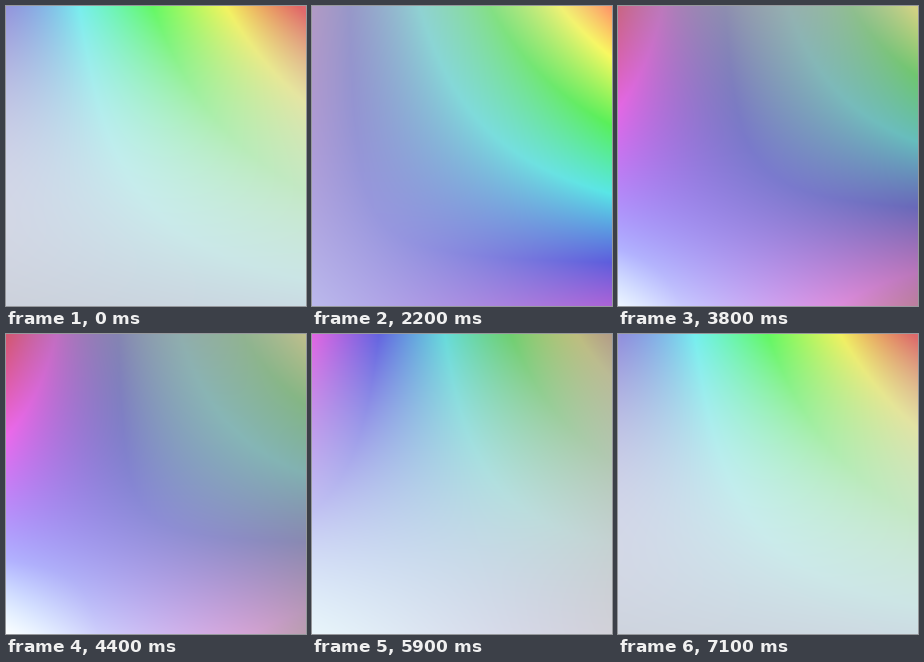
An HTML page with a canvas for the animation above (7200 ms loop, 300 px wide and 300 px high).

```html
<!DOCTYPE html>
<html lang="en">
<head>
<meta charset="utf-8">
<style>
html, body { margin: 0; height: 100%; overflow: hidden; }
canvas { display: block; width: 100vw; height: 100vh; }
</style>
</head>
<body>
<canvas id="stage" width="300" height="300"></canvas>
<script>
const SIZE = 300, LOOP = 7200, STEP = 100;
const ctx = document.getElementById('stage').getContext('2d');
const image = ctx.createImageData(SIZE, SIZE);

// Each corner's hue, saturation and lightness swing once per loop: [mean, cosine, sine].
const corners = {
  topLeft:     { hue: [289, -49, -36], sat: [47, 3, -21],    light: [66, 6, 5] },
  topRight:    { hue: [23, -29, -19],  sat: [60, 5, 44],     light: [66, -2, 4] },
  bottomLeft:  { hue: [220, 0, 24],    sat: [63, -46, -23],  light: [89, -6, -9] },
  bottomRight: { hue: [264, -66, -9],  sat: [33, -2, 27],    light: [72, 12, -7] }
};
const TOP_GLOW = 34, MIDDLE_GLOW = 8;

const mix = (a, b, f) => a + (b - a) * f;
const clamp = (v, lo, hi) => Math.min(hi, Math.max(lo, v));

function draw(time) {
  const angle = 2 * Math.PI * time / LOOP;
  const cos = Math.cos(angle), sin = Math.sin(angle);
  const wave = ([mean, c, s]) => mean + c * cos + s * sin;
  const edges = name => {
    const [tl, tr, bl, br] = Object.values(corners).map(corner => wave(corner[name]));
    return v => [mix(tl, bl, v), mix(tr, br, v)];
  };
  const hueAt = edges('hue'), satAt = edges('sat'), lightAt = edges('light');

  let p = 0;
  for (let y = 0; y < SIZE; y++) {
    const v = (y + 0.5) / SIZE;
    const hue = hueAt(v), sat = satAt(v), light = lightAt(v);
    const satGlow = TOP_GLOW * cos * (1 - v);
    const lightGlow = MIDDLE_GLOW * cos * Math.sin(Math.PI * v);
    for (let x = 0; x < SIZE; x++) {
      const u = (x + 0.5) / SIZE;
      const h = (mix(...hue, u) + 360) / 30;
      const s = clamp((mix(...sat, u) + satGlow * Math.sin(Math.PI * u)) / 100, 0, 1);
      const l = clamp((mix(...light, u) + lightGlow) / 100, 0, 1);
      const chroma = s * Math.min(l, 1 - l);
      for (const offset of [0, 8, 4]) {
        const k = (offset + h) % 12;
        image.data[p++] = 255 * (l - chroma * clamp(Math.min(k - 3, 9 - k), -1, 1));
      }
      image.data[p++] = 255;
    }
  }
  ctx.putImageData(image, 0, 0);
}

let shown = -1;
const start = performance.now();
function tick() {
  const elapsed = (performance.now() - start) % LOOP;
  const time = Math.floor(elapsed / STEP) * STEP;
  if (time !== shown) draw(shown = time);
  requestAnimationFrame(tick);
}
tick();
</script>
</body>
</html>
```
